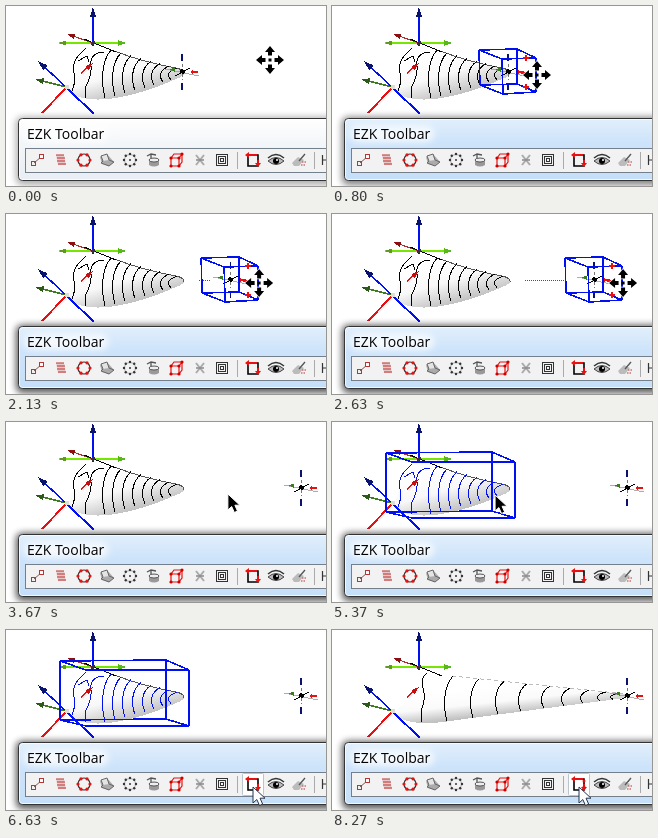
Animation of 320x180 px, one loop 9000 ms. Source, as an HTML page:

```html
<!DOCTYPE html>
<html lang="en">
<head>
<meta charset="utf-8">
<title>Toolbar demo</title>
<style>
html, body { margin: 0; width: 100%; height: 100%; overflow: hidden; background: #fff; }
svg { display: block; width: 100vw; height: 100vh; }
text { font-family: "Open Sans", "Noto Sans", sans-serif; }
</style>
</head>
<body>
<svg id="stage" viewBox="0 0 320 180" fill="none" xmlns="http://www.w3.org/2000/svg">
  <defs>
    <linearGradient id="skin" gradientUnits="userSpaceOnUse" x1="118" y1="44" x2="130" y2="87">
      <stop offset="0" stop-color="#fff"/><stop offset=".5" stop-color="#f8f8f8"/><stop offset="1" stop-color="#c2c2c2"/>
    </linearGradient>
    <linearGradient id="skinLong" gradientUnits="userSpaceOnUse" x1="177" y1="55" x2="180" y2="83">
      <stop offset="0" stop-color="#fff"/><stop offset=".55" stop-color="#fafafa"/><stop offset="1" stop-color="#c2c2c2"/>
    </linearGradient>
    <linearGradient id="idle" x1="0" y1="0" x2="0" y2="1">
      <stop offset="0" stop-color="#fff"/><stop offset=".4" stop-color="#f3f6f9"/><stop offset="1" stop-color="#e8eef4"/>
    </linearGradient>
    <linearGradient id="active" x1="0" y1="0" x2="0" y2="1">
      <stop offset="0" stop-color="#e2effc"/><stop offset=".4" stop-color="#cde3fa"/><stop offset="1" stop-color="#c6dff8"/>
    </linearGradient>
    <filter id="blur" x="-20%" y="-60%" width="140%" height="220%"><feGaussianBlur stdDeviation="3.5"/></filter>
  </defs>
  <rect width="320" height="180" fill="#fff"/>
  <g id="scene" shape-rendering="crispEdges"></g>
  <g id="panel"></g>
  <g id="moveCursor"></g>
  <path id="arrow" d="M0 0V16L3.8 12.5L6.5 18.5L9.6 17L7 11.2H12Z" stroke-width="1"/>
</svg>
<script>
const $ = id => document.getElementById(id);
const path = (d, stroke, w = 1, extra = '') => `<path d="${d}" stroke="${stroke}" stroke-width="${w}" ${extra}/>`;
const fill = (d, color) => `<path d="${d}" fill="${color}"/>`;
const rect = (x, y, w, h, attrs) => `<rect x="${x}" y="${y}" width="${w}" height="${h}" ${attrs}/>`;
const dot = (x, y, r, color) => `<circle cx="${x}" cy="${y}" r="${r}" fill="${color}"/>`;
const group = (id, body) => `<g id="${id}">${body}</g>`;

const BLUE = '#0010f0', NAVY = '#0a1270', RED = '#e81010', GREEN = '#74e600', INK = '#000';

// Axis line ending in a solid cone-shaped head
function axis(x1, y1, x2, y2, color, head, size = 9, width = 1.6) {
  const a = Math.atan2(y2 - y1, x2 - x1), c = Math.cos(a), s = Math.sin(a);
  const bx = x2 - c * size, by = y2 - s * size, w = size * .33;
  return path(`M${x1} ${y1}L${bx} ${by}`, color, width) +
    fill(`M${x2} ${y2}L${bx - s * w} ${by + c * w}L${bx + s * w} ${by - c * w}Z`, head);
}

// Cross-section curve: hooks right at the top, bulges to the left
const rib = (x, y, bottom, lean) => {
  const bx = x - lean, h = bottom(bx) - y;
  return `M${x} ${y}C${x - lean - 4} ${y + h * .25} ${bx - 4} ${y + h * .7} ${bx} ${y + h}`;
};

const shortBottom = x => 93 - Math.pow(Math.max(0, x - 90) / 82, 1.25) * 22;
const shortRibs = [105, 115, 125, 135, 145, 154, 163, 171]
  .map(x => rib(x, 44 + (x - 105) * .28, shortBottom, 6)).join('') +
  'M80 42L72 50Q66 57 68 67Q70 76 66 85M98 46Q84 47 85 58Q86 70 80 80L79 92M72 55L81 50L83 56';

const longBottom = x => 91 - (x - 114) * .13;
const longRibs = [121, 147, 172, 195, 218, 238, 257, 274, 287]
  .map(x => rib(x, 46 + (x - 121) * .105, longBottom, 6)).join('') + 'M95 43Q88 48 91 58Q94 68 90 78L89 92';

const shortBody =
  fill('M62 82C66 70 70 62 72 51Q77 40 88 40L97 40Q130 54 170 62Q179 64 178 68Q176 71 170 73Q146 84 120 90Q84 98 66 88Z', 'url(#skin)') +
  path('M108 45Q140 57 170 62Q179 64 178 68', '#555', 1) +
  path(shortRibs, INK, 1, 'id="ribs"');

const longBody =
  fill('M62 82C75 74 80 60 82 45L92 40Q108 45 124 46L292 64Q299 66 293 68Q200 80 125 90Q84 97 68 88Z', 'url(#skinLong)') +
  path('M120 46L294 64', '#bbb', 1, 'stroke-dasharray="4 3"') + path(longRibs, INK);

const axes =
  path('M53 37H87', GREEN, 1.6) + fill('M52 37L60 34.5V39.5Z', '#5d9a20') +
  axis(87, 37, 121, 37, GREEN, '#58b818', 9) +
  axis(87, 40, 87, 1, BLUE, NAVY, 10) +
  axis(87, 37, 61, 28, '#a33', '#8a1010', 8, 1) +
  path('M78 33L110 46', INK, 1) + dot(87, 37, 2, '#333') +
  axis(60, 81, 32, 55, BLUE, NAVY, 10) + path('M62 83L88 108', BLUE, 2) +
  path('M60 82L36 107', RED, 2) +
  axis(60, 81, 29, 73, '#3d7d20', '#2d5a18', 9) + dot(61, 81, 2.3, '#ddd');

// Small component drawn around its own centre
const tip =
  path('M0-18V-11M0 11V18', NAVY, 1.2) + path('M0-8V8', '#555', .8, 'stroke-dasharray="3 2"') +
  path('M-17-3L17 4', '#999', .8) + path('M-7 4L8-4', INK, 1) +
  fill('M-13-3L-7-4V0Z', '#3b7c22') + path('M9 0H16', RED, 1.5) +
  fill('M10-2L15 0L10 2Z', RED) + fill('M-3-1L0-3L4 0L1 2Z', INK);

const tipBox =
  path('M-29-22L9-23L28-14L-6-13ZM-28 13L9 12L28 20L-5 22ZM-29-22L-28 13M9-23V12M28-14V20M-6-13L-5 22', BLUE, 1.6);
const grips = path('M15-14H21M18-17V-11M15 15H21M18 12V18M13 1H18', RED, 1.4);

$('scene').innerHTML =
  group('shortBody', shortBody) + group('longBody', longBody) + axes +
  axis(75, 67, 87, 57, RED, '#c01010', 8) +
  group('bodyBox', path('M54 31L160 30L183 40H80ZM54 90L160 89L183 96H80ZM54 31V90M160 30V89M183 40V96', BLUE, 1.6)) +
  path('', RED, 1, 'id="trail" stroke-dasharray="1 1"') +
  group('tip', tip + group('tipBox', tipBox + grips));

// Toolbar icons, each around 0,0
const ring = (n, r, color, size) => Array.from({length: n}, (_, i) =>
  dot(r * Math.cos(i * 2 * Math.PI / n), r * Math.sin(i * 2 * Math.PI / n), size, color)).join('');
const DARK = '#333', CRIMSON = '#b33';
const icons = [
  [32, path('M-4 3L3-3', '#855', 1) + rect(-6.5, 1.5, 4, 4, `stroke="${CRIMSON}"`) + rect(1.5, -5.5, 4, 4, `stroke="${CRIMSON}" fill="#fff"`)],
  [55, fill('M-5-5H3L5 5H-3Z', '#e6c8c8') + path('M-5-5H3M-4-2H4M-4 1H4M-3 4H5', CRIMSON, 1.2)],
  [78, '<circle r="6" stroke="#333" stroke-width="1.2"/>' + ring(6, 6, RED, 1.6)],
  [101, fill('M-7-3L0-6L7 2L2 6L-5 4Z', '#aaa') + fill('M-6-4L0-6L2 0L-4 1Z', '#e4e4e4') + path('M-6-4L-4 1L-6 3L2 6L7 2L2 0L0-6Z', '#666')],
  [124, '<circle r="5.5" stroke="#999" stroke-width=".8"/>' + ring(8, 6, DARK, 1.2) + dot(0, 0, 1, DARK)],
  [147, fill('M-4 0H6V5Q1 8-4 5Z', '#999') + '<ellipse cx="1" rx="5" ry="2" fill="#eee" stroke="#555"/>' + path('M-6-4L-2-6L3-5M-2-6V-2', '#555', 1.3)],
  [170, path('M-5-2H3V6H-5ZM-5-2L-2-6H6L3-2M6-6V2L3 6', RED, 1.2) + [[-5, -2], [3, -2], [3, 6], [-5, 6], [6, -6]].map(p => dot(...p, 1.6, '#c00')).join('')],
  [194, path('M-4-5L4 5M4-5L-4 5', '#aaa', 2) + path('M-4 0H4', '#888', 1.5)],
  [216, [12, 8, 4].map(s => rect(-s / 2 + .5, -s / 2 + .5, s - 1, s - 1, `stroke="${DARK}"`)).join('')],
  [247, path('M-5-5H5V6H-5Z', INK, 1.6) + path('M-6-5H4M5 0V6', RED, 2) + fill('M-8-5L-4-8V-2Z', RED) + fill('M2 3H8L5 7Z', RED)],
  [270, fill('M-8 1Q0-6 8 1Q0 8-8 1Z', '#bbb') + path('M-8 1Q0-6 8 1Q0 8-8 1Z', '#444') + dot(0, 1, 3, INK) + dot(1, 0, 1, '#fff') + path('M-8-2Q0-9 8-2', DARK, 1.5)],
  [293, fill('M-7 3L-1-3L5 0L0 6H-5Z', '#bbb') + path('M0 1L6-6', '#555', 1.3) + path('M2 5H7M3 2H7', CRIMSON, 1, 'stroke-dasharray="1.5 1"')],
  [319, path('M-2.5-5V5M-2 0H3', DARK, 1.2)]
];

$('panel').innerHTML =
  rect(10, 111, 330, 68, 'rx="6" fill="#000" id="shadow" filter="url(#blur)"') +
  rect(12.5, 112.5, 330, 62, 'rx="4" stroke="#333" id="frame"') +
  rect(13.5, 113.5, 330, 60, 'rx="3" stroke="#fff" opacity=".75"') +
  rect(18, 120, 84, 16, 'rx="8" fill="#fff" opacity=".75" filter="url(#blur)"') +
  rect(19.5, 142.5, 320, 24, 'fill="#f2f2f2" stroke="#73808c"') +
  '<text x="21" y="133" font-size="14" fill="#000">EZK Toolbar</text>' +
  rect(236.5, 143.5, 21, 22, 'id="hover" rx="1" fill="#fff" stroke="#b9c4cc"') +
  path('M231.5 146V163M308.5 146V163', '#aaa') +
  icons.map(([x, body]) => `<g transform="translate(${x} 154)">${body}</g>`).join('') +
  group('pressed', dot(252, 151, 1.5, RED) + dot(252, 157, 1.5, RED));

$('moveCursor').innerHTML = [0, 90, 180, 270].map(a =>
  `<g transform="rotate(${a})">` +
  path('M0-14L5-8H2V-4.5H-2V-8H-5Z', '#fff', 1.4, `fill="${INK}" paint-order="stroke"`) + '</g>').join('') +
  rect(-1.5, -1.5, 3, 3, `fill="${INK}"`);

// Keys are [time, value...]; linear between, held outside
function track(keys, t) {
  if (t <= keys[0][0]) return keys[0].slice(1);
  for (let i = 1; i < keys.length; i++) {
    const a = keys[i - 1], b = keys[i];
    if (t < b[0]) {
      const k = (t - a[0]) / (b[0] - a[0]);
      return a.slice(1).map((v, j) => v + (b[j + 1] - v) * k);
    }
  }
  return keys[keys.length - 1].slice(1);
}

const approach = [[130, 264, 54], [300, 246, 58], [500, 216, 66], [630, 205, 69]];
const drag = [[1400, 0], [1730, 9], [2000, 36], [2270, 61], [2330, 64], [2630, 86], [2950, 109], [3200, 119]];
const pointer = [[3530, 300, 70], [3670, 222, 72], [3950, 187, 73], [4300, 163, 73],
  [5370, 163, 73], [5650, 184, 94], [6000, 228, 139], [6270, 247, 157]];

const show = (id, on) => $(id).setAttribute('display', on ? 'inline' : 'none');
const place = (id, x, y) => $(id).setAttribute('transform', `translate(${x} ${y})`);

function draw(t) {
  const [shift] = track(drag, t);
  const moving = t < 3530, rebuilt = t >= 8270, chosen = t >= 4530 && !rebuilt;

  show('shortBody', !rebuilt);
  show('longBody', rebuilt);
  show('bodyBox', chosen);
  $('ribs').setAttribute('stroke', chosen ? BLUE : INK);

  place('tip', 176 + shift, 66);
  show('tipBox', t >= 560 && moving);
  const end = Math.max(147 + shift, Math.min(195 + shift, 204));
  $('trail').setAttribute('d', `M193 66.5H${end}`);
  show('trail', t >= 1430 && moving);

  const awake = Math.min(1, Math.max(0, (t - 765) / 70));
  $('frame').setAttribute('fill', awake >= .5 ? 'url(#active)' : 'url(#idle)');
  $('shadow').setAttribute('opacity', .32 + .33 * awake);
  show('hover', t >= 6470);
  $('hover').setAttribute('opacity', Math.min(1, .25 + (t - 6470) / 213));
  show('pressed', rebuilt);

  const [mx, my] = t < 1400 ? track(approach, t) : [205 + shift, 69];
  show('moveCursor', moving);
  place('moveCursor', mx, my);

  const light = t >= 6300;
  show('arrow', !moving);
  place('arrow', ...track(pointer, t));
  $('arrow').setAttribute('fill', light ? '#fff' : '#000');
  $('arrow').setAttribute('stroke', light ? '#26364d' : '#fff');
}

const start = performance.now();
function tick() {
  draw((performance.now() - start) % 9000);
  requestAnimationFrame(tick);
}
tick();
</script>
</body>
</html>
```
